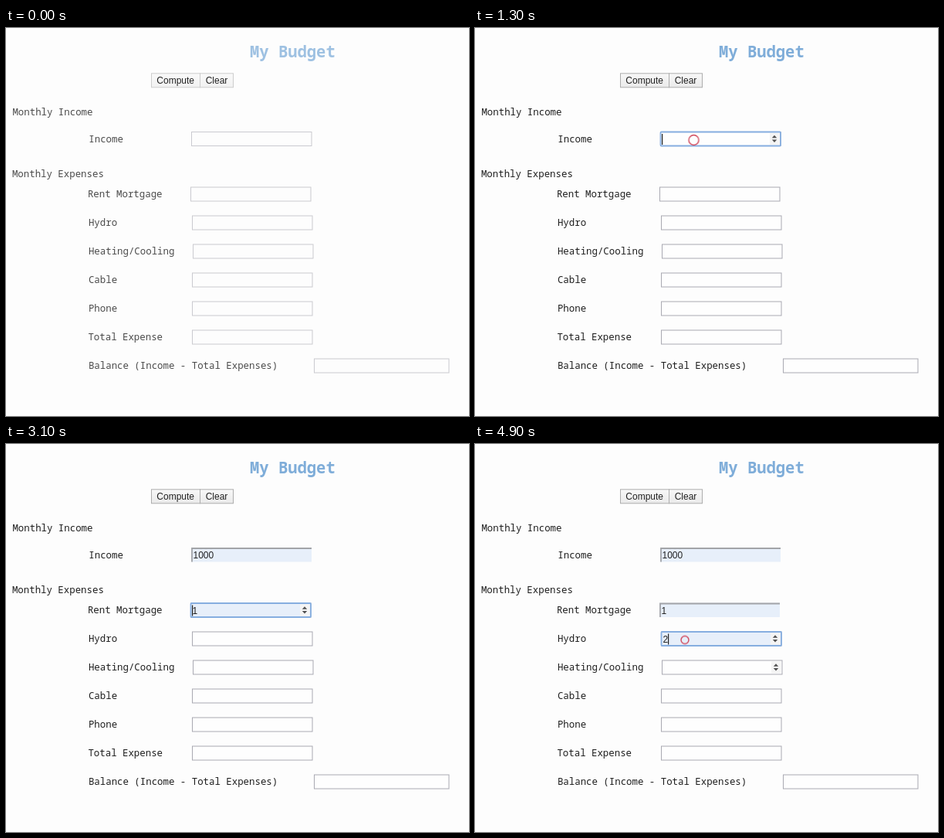
These frames come from a looping animation (600 px wide and 502 px high, 5 s). An HTML page:

```html
<!DOCTYPE html>
<html lang="en">
<head>
<meta charset="utf-8">
<title>My Budget</title>
<style>
html, body { margin: 0; width: 100%; height: 100%; overflow: hidden; background: #fdfdfd; }
svg { display: block; width: 600px; height: 502px; }
text { white-space: pre; }
.label { font: 12.4px "Noto Sans Mono", monospace; fill: #1e1e1e; }
.title { font: bold 20.5px "Noto Sans Mono", monospace; fill: #7fadd9; }
.ui { font: 12px "Liberation Sans", Arial, sans-serif; fill: #222; }
.ring { fill: none; stroke: #d0465a; stroke-width: 1.4; }
.caret { fill: #222; }

/* The page resolves from a pale first picture */
.soft { animation: sharpen 5s step-end infinite; }
@keyframes sharpen { 0% { opacity: var(--o); } 2% { opacity: .92; } 4% { opacity: 1; } }

/* Timed parts stay hidden until their keyframes show them */
.t { visibility: hidden; animation: 5s step-end infinite; }

.arrow { animation-name: arrow; }
@keyframes arrow {
  6% { visibility: visible; transform: translate(292px, 176px); animation-timing-function: steps(3); }
  12% { transform: translate(286px, 159px); }
  18% { visibility: hidden; transform: translate(286px, 159px); }
}

.ring1 { animation-name: ring1; }
@keyframes ring1 {
  18% { visibility: visible; r: 15px; transform: translate(285px, 157px); animation-timing-function: steps(4); }
  26% { r: 6.5px; transform: translate(283.5px, 145px); }
  28% { r: 5px; transform: translate(283.5px, 145px); }
  36% { visibility: hidden; }
}
.ring2 { animation-name: ring2; }
@keyframes ring2 {
  46% { visibility: visible; r: 13.5px; transform: translate(278px, 226px); animation-timing-function: steps(4); }
  54% { r: 5px; transform: translate(276px, 216px); }
  56% { visibility: hidden; }
}
.ring3 { animation-name: ring3; }
@keyframes ring3 {
  84% { visibility: visible; r: 13.5px; transform: translate(274px, 263.5px); animation-timing-function: steps(4); }
  92% { r: 5px; transform: translate(272px, 253.5px); }
  99.99% { r: 5px; transform: translate(272px, 253.5px); }
}

.spin1 { animation-name: spin1; }
.spin2 { animation-name: spin2; }
.spin3 { animation-name: spin3; }
.spin4 { animation-name: spin4; }
@keyframes spin1 { 18% { visibility: visible; } 46% { visibility: hidden; } }
@keyframes spin2 { 40% { visibility: visible; } 84% { visibility: hidden; } }
@keyframes spin3 { 74% { visibility: visible; } }
@keyframes spin4 { 98% { visibility: visible; } }

.focus1 { animation-name: focus1; }
.focus2 { animation-name: focus2; }
.focus3 { animation-name: focus3; }
@keyframes focus1 { 22% { visibility: visible; } 46% { visibility: hidden; } }
@keyframes focus2 { 48% { visibility: visible; } 84% { visibility: hidden; } }
@keyframes focus3 { 86% { visibility: visible; } }

.value1 { animation-name: value1; }
.value2 { animation-name: value2; }
.value3 { animation-name: value3; }
@keyframes value1 { 36% { visibility: visible; } }
@keyframes value2 { 56% { visibility: visible; } }
@keyframes value3 { 94% { visibility: visible; } }

.inset1 { animation-name: inset1; }
.inset2 { animation-name: inset2; }
@keyframes inset1 { 46% { visibility: visible; } }
@keyframes inset2 { 84% { visibility: visible; } }

.caret1 { animation-name: caret1; }
.caret2 { animation-name: caret2; }
.caret3 { animation-name: caret3; }
@keyframes caret1 {
  22% { visibility: visible; transform: none; }
  38% { transform: translateX(27px); }
  46% { visibility: hidden; }
}
@keyframes caret2 {
  48% { visibility: visible; transform: none; }
  70% { transform: translateX(7px); }
  84% { visibility: hidden; }
}
@keyframes caret3 {
  86% { visibility: visible; transform: none; }
  96% { transform: translateX(7px); }
}
</style>
</head>
<body>
<svg viewBox="0 0 600 502">
  <defs>
    <linearGradient id="face" x2="0" y2="1">
      <stop offset="0" stop-color="#f8f8f8"/>
      <stop offset="1" stop-color="#eaeaea"/>
    </linearGradient>
    <rect id="box" x=".5" y=".5" width="155.5" height="18" fill="#fefefe" stroke="#a9a9b2"/>
    <rect id="fill" x="1" y="1" width="154.5" height="17" fill="#e7effa"/>
    <rect id="focus" x=".5" y=".5" width="155.5" height="18" rx="1" fill="none" stroke="#86aee0" stroke-width="1.8"/>
    <g id="inset">
      <rect x="-.5" y="-.5" width="158" height="20" fill="#fdfdfd"/>
      <rect width="156" height="18.5" fill="#e7effa"/>
      <path d="M156 1H1V18.5" fill="none" stroke="#a2a4a8" stroke-width="1.8"/>
    </g>
    <g id="spin">
      <rect x="142" y="2" width="12.5" height="15" fill="#f4f4f4"/>
      <path d="M144.8 8.2L148 4.8L151.2 8.2ZM144.8 10.6L148 14L151.2 10.6Z" fill="#505050"/>
    </g>
    <rect id="bar" x="2" y="3" width="1.2" height="14"/>
  </defs>

  <rect width="600" height="502" fill="#fdfdfd"/>
  <text class="title soft" style="--o:.75" x="316" y="38">My Budget</text>

  <g class="soft" style="--o:.6">
    <g fill="url(#face)" stroke="#adadad">
      <rect x="188.5" y="58.8" width="63" height="18"/>
      <rect x="251.5" y="58.8" width="43" height="18"/>
    </g>
    <use href="#box" x="240" y="134"/>
    <use href="#box" x="239" y="205.5"/>
    <use href="#box" x="241" y="242.5"/>
    <use href="#box" x="242" y="279.5"/>
    <use href="#box" x="241" y="316.5"/>
    <use href="#box" x="241" y="353.5"/>
    <use href="#box" x="241" y="390.5"/>
    <rect x="399.5" y="428" width="174.5" height="18" fill="#fefefe" stroke="#a9a9b2"/>
  </g>

  <g class="ui">
    <text x="195.3" y="72.4">Compute</text>
    <text x="258.7" y="72.4">Clear</text>
  </g>

  <g class="label soft" style="--o:.8">
    <text x="8.4" y="112.5">Monthly Income</text>
    <text x="107.3" y="147.5">Income</text>
    <text x="7.9" y="192.5">Monthly Expenses</text>
    <text x="105.9" y="219">Rent Mortgage</text>
    <text x="106.9" y="256">Hydro</text>
    <text x="106.9" y="293">Heating/Cooling</text>
    <text x="106.9" y="330">Cable</text>
    <text x="106.9" y="367">Phone</text>
    <text x="106.4" y="404">Total Expense</text>
    <text x="106.9" y="441">Balance (Income - Total Expenses)</text>
  </g>

  <g class="ui" transform="translate(240 134)">
    <use class="t value1" href="#fill"/>
    <use class="t focus1" href="#focus"/>
    <use class="t inset1" href="#inset"/>
    <use class="t spin1" href="#spin"/>
    <text class="t value1" x="2.5" y="14">1000</text>
    <use class="t caret caret1" href="#bar"/>
  </g>

  <g class="ui" transform="translate(239 205.5)">
    <use class="t value2" href="#fill"/>
    <use class="t focus2" href="#focus"/>
    <use class="t inset2" href="#inset"/>
    <use class="t spin2" href="#spin"/>
    <text class="t value2" x="2.5" y="14">1</text>
    <use class="t caret caret2" href="#bar"/>
  </g>

  <g class="ui" transform="translate(241 242.5)">
    <use class="t value3" href="#fill"/>
    <use class="t focus3" href="#focus"/>
    <use class="t spin3" href="#spin"/>
    <text class="t value3" x="2.5" y="14">2</text>
    <use class="t caret caret3" href="#bar"/>
  </g>

  <use class="t spin4" href="#spin" x="242" y="279.5"/>

  <circle class="t ring ring1"/>
  <circle class="t ring ring2"/>
  <circle class="t ring ring3"/>
  <path class="t arrow" d="M0 0V13L3 10.3L5.2 15.2L7.3 14.2L5.2 9.5H9Z" fill="#fff" stroke="#55555c"/>
</svg>
</body>
</html>
```
